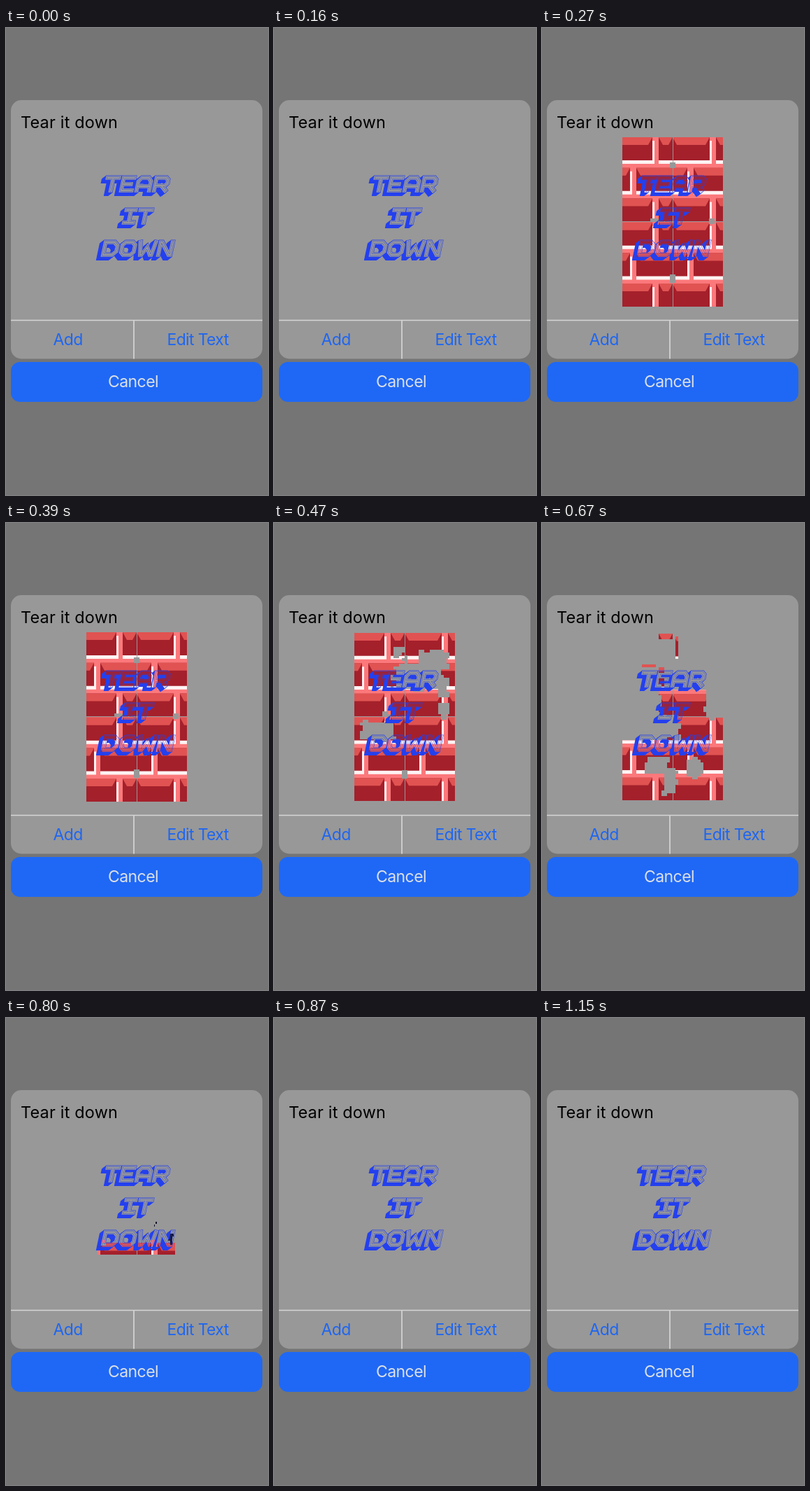
These frames come from a looping animation (375 px wide and 667 px high, 1330 ms). An HTML page:

```html
<!DOCTYPE html>
<html lang="en">
<head>
<meta charset="utf-8">
<title>Tear it down</title>
<style>
html, body { margin: 0; width: 100%; height: 100%; overflow: hidden; background: #757575; }
svg { display: block; }
text { font-family: Inter, "Liberation Sans", sans-serif; }
.button { font-size: 23px; text-anchor: middle; fill: #1f66f0; }
.button.main { fill: #dcdfe6; }
</style>
</head>
<body>
<svg width="375" height="667" viewBox="0 0 375 667">
  <defs>
    <mask id="lettering" maskUnits="userSpaceOnUse" x="115" y="200" width="144" height="150"></mask>
    <clipPath id="standing"><path id="cells"/></clipPath>
  </defs>
  <rect width="375" height="667" fill="#757575"/>
  <rect x="7" y="103" width="360" height="369.5" rx="15" fill="#989898"/>
  <path d="M7 417.5H367M183 417.5V472.5" stroke="#d5d5d5" stroke-width="1.7"/>
  <rect x="7" y="477" width="360" height="57" rx="13" fill="#1f68f5"/>
  <text x="21" y="142.5" font-size="23.4" letter-spacing=".22">Tear it down</text>
  <text class="button" x="88.5" y="453" letter-spacing="-.6">Add</text>
  <text class="button" x="274.5" y="453" letter-spacing="-.65">Edit Text</text>
  <text class="button main" x="182" y="513" letter-spacing="-.55">Cancel</text>
  <g clip-path="url(#standing)"><g id="bricks"></g></g>
  <path id="specks" d="M214 291h2v3h-2zM212 295h1v3h-1zM234 308h6v4h-2v12h-3v-6h-3v-4h2z" fill="#15152c"/>
  <rect x="115" y="200" width="144" height="150" fill="#2440ee" mask="url(#lettering)"/>
</svg>
<script>
const $ = id => document.getElementById(id);
const LOOP = 1330;
const WALL = { left: 115, top: 156, right: 259, bottom: 398 };
const SEAM = { x: 187, y: 277 };
const CELL = 4;

function add(parent, tag, attrs) {
  const el = document.createElementNS('http://www.w3.org/2000/svg', tag);
  for (const key in attrs) el.setAttribute(key, attrs[key]);
  parent.append(el);
}

const box = (l, t, r, b) => `M${l} ${t}H${r}V${b}H${l}Z`;

// Repeatable noise from 0 to 1
function noise(i, j) {
  const n = Math.sin(i * 127.1 + j * 311.7) * 43758.5453;
  return n - Math.floor(n);
}

// Letter skeletons with their widths, 18 high
const GLYPHS = {
  T: [16, 'm0 0h16m-8 0v18'],
  E: [15, 'm15 0h-15v18h15m-15 -9h12'],
  A: [18, 'm0 18v-13l4 -5h10l4 5v13m-18 -6h18'],
  R: [17, 'm0 18v-18h14l3 3v5l-3 3h-14m9 0l7 7'],
  I: [13, 'm0 0h13m-6.5 0v18m-6.5 0h13'],
  D: [18, 'm0 0h13l5 5v8l-5 5h-13z'],
  O: [18, 'm4 0h10l4 4v10l-4 4h-10l-4 -4v-10z'],
  W: [22, 'm0 0l3 18h2l6 -11l6 11h2l3 -18'],
  N: [17, 'm0 18v-18h2l13 18h2v-18']
};

// Widened skeletons nest into a double outline with an extruded side
function writeWord(word, x, y) {
  let d = '';
  for (const letter of word) {
    const [width, path] = GLYPHS[letter];
    d += `M${x} ${y}${path}`;
    x += width + 7;
  }
  const layer = (dx, dy, width, tone) => add($('lettering'), 'path', {
    d, fill: 'none', stroke: tone, 'stroke-width': width,
    'stroke-linecap': 'square', 'stroke-miterlimit': 3,
    transform: `translate(${dx + .21 * (y + 22)} ${dy}) skewX(-11.86)`
  });
  for (let i = 7; i > 0; i--) layer(-i * .85, i * .65, 6.8, '#fff');
  layer(0, 0, 6.8, '#fff');
  layer(0, 0, 5.6, '#000');
  layer(0, 0, 3, '#bbb');
  layer(0, 0, 2, '#000');
}

function layBricks() {
  const shape = (d, fill) => add($('bricks'), 'path', { d, fill });
  const brick = (l, r, y, cut) => {
    shape(box(l, y + 5, r + 3, y + (cut ? 33 : 38)), '#fff3f3');
    shape(box(l, y, r, y + 33), '#a4202b');
    shape(`M${l} ${y}H${r}L${r - 6} ${y + 11}H${l + 6}Z`, '#e05352');
  };
  shape(box(WALL.left, WALL.top, WALL.right, WALL.bottom), '#fb787b');
  for (let row = 0; row < 6; row++) {
    const course = row % 3;
    const y = WALL.top + 43.7 * course + (row > 2 ? 121.7 : 0);
    const start = course === 1 ? 53 : 85;
    for (let x = start; x < WALL.right; x += 82) {
      const end = x + 73;
      const split = course !== 1 && x < SEAM.x && end > SEAM.x;
      brick(x, split ? SEAM.x : end, y, course === 2);
      if (split) brick(SEAM.x, end, y, course === 2);
    }
  }
  add($('bricks'), 'path', {
    d: `M${SEAM.x + .5} ${WALL.top}V${WALL.bottom}M${WALL.left} ${SEAM.y - .5}H${WALL.right}`,
    stroke: '#989898'
  });
}

// Blows are x, y, half width, half height; damage adds up over the steps
const STEPS = [
  { at: 0, half: 0, blows: [] },
  { at: 270, half: 121, blows: [[187, 195, 4, 4], [187, 358, 3, 6], [244, 277, 4, 5], [161, 274, 5, 3]] },
  { at: 470, half: 120, blows: [
    [206, 220, 36, 18], [230, 196, 20, 13], [178, 184, 8, 8], [242, 234, 8, 14], [150, 297, 25, 13], [243, 266, 8, 8]
  ] },
  { at: 530, half: 120, blows: [
    [200, 179, 56, 23], [140, 291, 28, 15], [244, 245, 7, 32], [165, 346, 18, 12], [183, 371, 9, 16], [218, 350, 11, 13]
  ] },
  { at: 670, half: 119, blows: [[136, 240, 32, 40], [187, 180, 90, 26], [251, 237, 16, 40], [152, 290, 44, 18]] },
  { at: 800, half: 121, rubble: [131, 305, 242, 338], blows: [[187, 308, 70, 13]] },
  { at: 870, half: 0, blows: [] }
];
const SPARED = [[177, 162, 10, 6], [192, 178, 2, 18]];

const reach = ([bx, by, rx, ry], x, y) => Math.max(Math.abs(x - bx) / rx, Math.abs(y - by) / ry);

// Cells still standing after the given blows, with ragged edges
function standing(blows, [left, top, right, bottom]) {
  let d = '';
  for (let y = top; y < bottom; y += CELL)
    for (let x = left; x < right; x += CELL) {
      const cx = x + CELL / 2, cy = y + CELL / 2;
      const edge = .82 + .36 * noise(Math.floor(cx / 9), Math.floor(cy / 8));
      const hit = blows.some(b => reach(b, cx, cy) < edge);
      const spared = SPARED.some(s => reach(s, cx, cy) < 1);
      if (!hit || spared) d += box(x, y, Math.min(x + CELL, right), Math.min(y + CELL, bottom));
    }
  return d;
}

function planSteps() {
  let blows = [];
  for (const step of STEPS) {
    blows = step.rubble ? step.blows : blows.concat(step.blows);
    const area = step.rubble || [WALL.left, SEAM.y - step.half, WALL.right, SEAM.y + step.half];
    step.cells = step.half ? standing(blows, area) : '';
  }
}

let shown;
function draw(time) {
  const step = STEPS.findLast(s => s.at <= time % LOOP);
  if (step === shown) return;
  shown = step;
  const squeeze = step.half / 121;
  $('cells').setAttribute('d', step.cells);
  $('bricks').setAttribute('transform', `translate(0 ${SEAM.y * (1 - squeeze)}) scale(1 ${squeeze})`);
  $('specks').setAttribute('visibility', step.rubble ? 'visible' : 'hidden');
}

writeWord('TEAR', 141, 214);
writeWord('IT', 168, 260);
writeWord('DOWN', 138, 306);
layBricks();
planSteps();

const begin = performance.now();
function tick() {
  draw(performance.now() - begin);
  requestAnimationFrame(tick);
}
draw(0);
requestAnimationFrame(tick);
</script>
</body>
</html>
```
